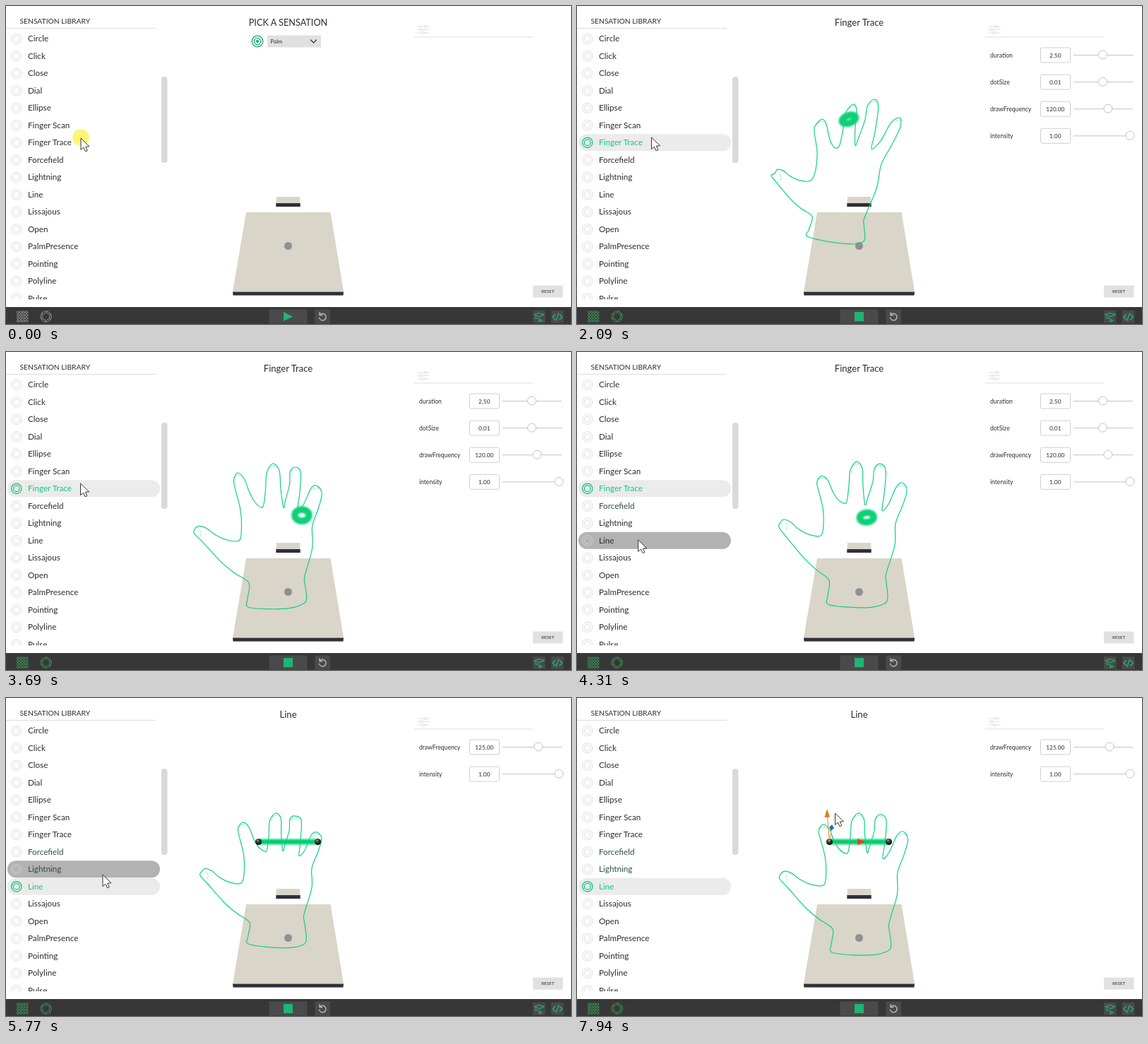
These frames come from a looping animation (800x450 px, 8 s). An HTML page:

```html
<!DOCTYPE html>
<html lang="en">
<head>
<meta charset="utf-8">
<title>Sensation library</title>
<style>
  html, body { margin: 0; width: 100%; height: 100%; overflow: hidden; background: #fff; }
  svg { display: block; width: 800px; height: 450px; font-family: Lato, "Open Sans", sans-serif; fill: #2d2d2d; }
  .line { fill: none; stroke-linecap: round; stroke-linejoin: round; }
  .green { stroke: #1fb574; }
</style>
</head>
<body>
<svg id="stage" viewBox="0 0 800 450">
  <defs>
    <clipPath id="listClip"><rect y="33" width="219" height="382"/></clipPath>
    <filter id="soft" x="-50%" y="-50%" width="200%" height="200%"><feGaussianBlur stdDeviation="1.3"/></filter>
    <filter id="softBar" filterUnits="userSpaceOnUse" x="345" y="190" width="110" height="28"><feGaussianBlur stdDeviation="1"/></filter>
    <radialGradient id="ball" cx=".4" cy=".3" r=".7">
      <stop offset="0" stop-color="#8d9690"/><stop offset=".4" stop-color="#343a36"/><stop offset="1" stop-color="#0c0f0d"/>
    </radialGradient>
  </defs>

  <g id="library">
    <text x="19.5" y="25" font-size="10.3">SENSATION LIBRARY</text>
    <path d="M0 31.5H212" stroke="#dcdcdc"/>
    <rect x="220" y="100" width="8.5" height="122" rx="4" fill="#d9d9d9"/>
    <g id="list" clip-path="url(#listClip)"></g>
  </g>

  <text id="title" x="399.5" y="27.5" font-size="13" text-anchor="middle"></text>
  <g id="picker">
    <g class="line" stroke="#12ab68" stroke-width="1.3">
      <circle cx="356" cy="50" r="7.8"/><circle cx="356" cy="50" r="4.6"/>
    </g>
    <circle cx="356" cy="50" r="2" fill="#12ab68"/>
    <rect x="370" y="41.5" width="76" height="17" fill="#dfe1e1"/>
    <text x="374.5" y="53" font-size="7.8">Palm</text>
    <path class="line" d="M431.5 48l4 4 4-4" stroke="#333" stroke-width="1.2"/>
  </g>

  <g class="line" stroke="#dedede">
    <path d="M583 29H599M583 33.5H599M583 38H599M578 44H746"/>
    <g fill="#fff"><circle cx="594" cy="29" r="1.8"/><circle cx="587" cy="33.5" r="1.8"/><circle cx="591" cy="38" r="1.8"/></g>
  </g>
  <g id="traceParams"></g>
  <g id="lineParams"></g>

  <g id="pad">
    <path d="M383 270H416L416.5 279H382.5Z" fill="#d9d5c8"/>
    <rect x="382.3" y="279" width="34.4" height="5" fill="#2e2f39"/>
    <path d="M340 292H459.5L478 404.5H321Z" fill="#d9d5c8"/>
    <path d="M321 404.5H478L477.5 409.5H321.5Z" fill="#2e2f39"/>
    <circle cx="399.5" cy="339.5" r="5.5" fill="#8e9095"/>
  </g>

  <g id="hand" class="line" stroke="#0fd084">
    <path id="outline" stroke-width="1.2"/>
    <path id="nails" stroke-width=".8" stroke-dasharray="4 2" opacity=".6"/>
  </g>
  <ellipse id="blob" rx="10" ry="8" fill="none" stroke="#08d078" stroke-width="9.5" filter="url(#soft)"/>

  <g id="segment">
    <g id="bar">
      <rect x="358" y="199.5" width="83" height="8" fill="#14d985" filter="url(#softBar)"/>
      <rect x="360" y="202" width="79" height="3" fill="#04c56c" filter="url(#softBar)"/>
    </g>
    <circle cx="357.5" cy="203.5" r="4.6" fill="url(#ball)"/>
    <circle cx="441.5" cy="203.5" r="4.6" fill="url(#ball)"/>
    <g id="gizmo">
      <path d="M357.5 203.5L354.5 168" stroke="#d98a2b"/>
      <path d="M350.5 169L354 157L358 168.5Z" fill="#d97c1e"/>
      <path d="M357.5 203.5L360 187" stroke="#c9a23c"/>
      <path d="M357 183L361 179L364 184L360 188Z" fill="#1f6fb5"/>
      <path d="M362 203.5H397" stroke="#b9742c"/>
      <path d="M397 199L408.5 203.5L397 208Z" fill="#d9481c"/>
    </g>
  </g>

  <rect x="746" y="395.5" width="42.5" height="17" fill="#e0e1e1"/>
  <text x="767.2" y="406.3" font-size="6.3" text-anchor="middle">RESET</text>

  <g id="toolbar">
    <rect y="426" width="800" height="24" fill="#373737"/>
    <g fill="#4a4a4a">
      <rect x="372.5" y="429.5" width="54" height="20"/>
      <rect x="437.5" y="429.5" width="21.5" height="20"/>
      <rect x="746" y="431" width="17.5" height="17.5"/>
      <rect x="772" y="431" width="17.5" height="17.5"/>
    </g>
    <g id="modes" class="line" stroke-width=".9">
      <g id="dots"></g>
      <circle cx="56.7" cy="439.5" r="7.6"/>
      <g id="blades"></g>
    </g>
    <path id="play" d="M393 433L406 439.5L393 446Z" fill="#1fb574"/>
    <rect id="stop" x="393" y="433" width="13" height="13" fill="#1fb574"/>
    <path class="line" d="M444.3 437.2A4.8 4.8 0 1 1 443.5 441.2M444 433.6V437.6H448" stroke="#b9b9b9" stroke-width="1.4"/>
    <path class="line green" d="M748 437L754 434.5L762 436.5L756 439.5ZM750 439.5V442L754 441.5M755 443V447L759 445Z" stroke-width="1.2"/>
    <path class="line green" d="M777.5 436.5L774 440L777.5 443.5M784 436.5L787.5 440L784 443.5M782.5 435L779 445" stroke-width="1.4"/>
  </g>

  <circle id="press" cx="106" cy="186" r="11.8" fill="#fbf45f" opacity=".85"/>
  <path id="cursor" d="M0 0V16.5L3.9 13.2L6.6 18.8L9.3 17.6L6.8 12.2L12 11.8Z" fill="#fff" stroke="#333" stroke-linejoin="round"/>
</svg>

<script>
const LOOP = 8000, ROW = 24.5, TRACE = 6, LINE = 9;
const PICK_TRACE = 310, PICK_LINE = 4540, HAND_IN = 390;
const NAMES = ['Circle', 'Click', 'Close', 'Dial', 'Ellipse', 'Finger Scan', 'Finger Trace', 'Forcefield',
  'Lightning', 'Line', 'Lissajous', 'Open', 'PalmPresence', 'Pointing', 'Polyline', 'Pulse'];

const $ = id => document.getElementById(id);
const show = (id, on) => $(id).style.display = on ? '' : 'none';

function add(parent, tag, attrs, text) {
  const el = document.createElementNS('http://www.w3.org/2000/svg', tag);
  for (const k in attrs) el.setAttribute(k, attrs[k]);
  if (text) el.textContent = text;
  parent.append(el);
  return el;
}

const rows = NAMES.map((name, i) => {
  const y = 46 + i * ROW, g = $('list');
  const pill = add(g, 'rect', { x: 2, y: y - 11.7, width: 216, height: 24, rx: 12 });
  const rings = [7.2, 4.4].map(r => add(g, 'circle', { cx: 14.8, cy: y + .3, r, fill: 'none' }));
  const label = add(g, 'text', { x: 31, y: y + 4, 'font-size': 11.7 }, name);
  return { pill, rings, label };
});

function addParams(id, params) {
  params.forEach(([name, value, knob], i) => {
    const y = 69.5 + i * 38.1, g = $(id);
    add(g, 'text', { x: 585, y: y + 3.3, 'font-size': 8.6 }, name);
    add(g, 'rect', { x: 656.5, y: y - 10.5, width: 42, height: 21, rx: 2, fill: '#fff', stroke: '#cfcfcf' });
    add(g, 'text', { x: 677.3, y: y + 3.2, 'font-size': 8.3, 'text-anchor': 'middle' }, value);
    add(g, 'path', { d: `M703 ${y}H787`, stroke: '#c4c4c4' });
    add(g, 'circle', { cx: knob, cy: y - .5, r: 6, fill: '#fff', stroke: '#c2c2c2' });
  });
}
addParams('traceParams', [['duration', '2.50', 744.5], ['dotSize', '0.01', 744.5],
  ['drawFrequency', '120.00', 752], ['intensity', '1.00', 783]]);
addParams('lineParams', [['drawFrequency', '125.00', 754], ['intensity', '1.00', 783]]);

for (let i = 0; i < 16; i++)
  add($('dots'), 'circle', { cx: 17 + i % 4 * 4.1, cy: 433.4 + (i >> 2) * 4.1, r: 1.6 });
for (let i = 0; i < 6; i++)
  add($('blades'), 'path', { d: 'M53 436.2L58.7 432.2', transform: `rotate(${i * 60} 56.7 439.5)` });

// Hand outline: each group starts at a landmark, followed by the points up to the next one.
const CONTOUR = [
  [366,328, 348,313, 330,296, 305,266, 295,253],
  [297,246, 302,242, 312,246, 322,255, 337,263],
  [354,265, 358,250, 357,225, 350,197, 349,188],
  [355,180, 364,186, 371,202, 378,213],
  [387,219, 391,216, 394,195, 396,172],
  [405,160, 413,170, 414,195],
  [417,221, 421,210, 428,188, 430,170],
  [438,163, 446,172, 444,205],
  [441,229, 450,220, 461,196],
  [470,190, 476,201, 470,222, 460,248, 459,278],
  [447,318, 447,330, 449,352],
  [444,361, 425,366, 395,366],
  [365,362, 364,350]
];
const V0 = 2, INDEX = 3, V1 = 4, MIDDLE = 5, V2 = 6, RING = 7, V3 = 8, PINKY = 9, THUMB = 1;
const BASE = CONTOUR.flatMap(c => c.slice(0, 2));
const HIGH = [370,308, 308,218, 367,245, 384,162, 408,208, 433,153, 436,213, 461,160, 457,225, 492,189, 450,312, 445,347, 364,341];
const TILT = [333,298, 280,237, 331,247, 347,160, 366,201, 391,139, 394,197, 421,132, 417,202, 457,158, 407,300, 402,335, 326,326];
const LEFT = [344,327, 267,251, 330,267, 328,171, 361,220, 378,158, 393,220, 409,163, 413,223, 440,189, 423,317, 421,356, 343,361];
const FLAT = [345,318, 277,246, 333,262, 335,176, 366,217, 382,163, 392,216, 409,167, 415,223, 440,190, 422,306, 421,349, 343,348];
const REST = [362,327, 288,250, 349,265, 348,179, 380,220, 398,163, 411,219, 430,165, 433,227, 462,189, 442,318, 440,358, 361,360];

const shift = (pose, dx, dy) => pose.map((v, i) => v + (i % 2 ? dy : dx));
const POSES = [
  [HAND_IN, shift(HIGH, -6, 8)], [1100, shift(HIGH, -1, 1)], [1400, HIGH], [1900, shift(TILT, 6, -4)], [2090, TILT],
  [2550, shift(LEFT, -20, 26)], [2950, shift(LEFT, -9, 6)], [3690, LEFT], [4250, shift(BASE, -10, -5)],
  [4850, BASE], [5770, FLAT], [6250, shift(REST, -5, -1)], [7000, shift(REST, -4, 0)],
  [7500, shift(REST, 0, -1)], [7940, REST], [8020, REST]
];
const CURSOR = [
  [0, [106, 187]], [80, [105.5, 186]], [3850, [105.5, 186]], [4440, [84, 277]], [5400, [84, 277]],
  [5720, [137, 250]], [7100, [137, 250]], [7500, [357, 203]], [7560, [357, 203]], [7860, [365.5, 163]], [8020, [365.5, 163]]
];

// Blob route over the hand: phase, landmark pair to average, offset.
const ROUTE = [
  [0, PINKY, PINKY, -4, 18], [.08, V3, V3, 6, 8], [.164, V2, V3, -10, 15], [.25, RING, RING, -5, 18],
  [.33, V2, V3, -10, 15], [.36, V1, V2, -3, 12], [.44, MIDDLE, MIDDLE, -6, 21], [.53, V1, V2, -3, 12],
  [.56, V1, V1, -16, 10], [.65, INDEX, INDEX, 0, 18], [.73, V1, V1, -16, 10], [.81, V0, V0, -8, 14],
  [.92, THUMB, THUMB, 12, 12], [1, PINKY, PINKY, -4, 18]
];

function span(keys, t) {
  let i = 0;
  while (i < keys.length - 2 && t >= keys[i + 1][0]) i++;
  const u = (t - keys[i][0]) / (keys[i + 1][0] - keys[i][0]);
  return [i, Math.min(1, Math.max(0, u))];
}

const mix = (a, b, u) => a.map((v, i) => v + (b[i] - v) * u);

function lerpAt(keys, t, ease = u => u) {
  const [i, u] = span(keys, t);
  return mix(keys[i][1], keys[i + 1][1], ease(u));
}

const smooth = u => u * u * (3 - 2 * u);

// Hermite curve through the keys, with reduced tangents to keep overshoot low.
function curveAt(keys, t) {
  const [i, u] = span(keys, t), dt = keys[i + 1][0] - keys[i][0];
  const slope = (k, n) => {
    const a = keys[Math.max(0, k - 1)], b = keys[Math.min(keys.length - 1, k + 1)];
    return .6 * (b[1][n] - a[1][n]) / (b[0] - a[0]);
  };
  return keys[i][1].map((a, n) => {
    const b = keys[i + 1][1][n], e = smooth(u);
    return a + (b - a) * e + dt * u * (1 - u) * ((1 - u) * slope(i, n) - u * slope(i + 1, n));
  });
}

function outlineOf(pose) {
  const pts = [], count = CONTOUR.length;
  CONTOUR.forEach((part, k) => {
    const next = (k + 1) % count, size = part.length / 2;
    for (let j = 0; j < size; j++) {
      const move = n => {
        const from = pose[2 * k + n] - BASE[2 * k + n], to = pose[2 * next + n] - BASE[2 * next + n];
        return from + (to - from) * j / size;
      };
      pts.push([part[2 * j] + move(0), part[2 * j + 1] + move(1)]);
    }
  });
  return pts;
}

function closedPath(pts) {
  const at = i => pts[(i + pts.length) % pts.length], f = v => v.toFixed(1);
  let d = 'M' + pts[0].map(f);
  pts.forEach((p, i) => {
    const a = at(i - 1), q = at(i + 1), b = at(i + 2);
    const c1 = [0, 1].map(n => f(p[n] + (q[n] - a[n]) / 6));
    const c2 = [0, 1].map(n => f(q[n] - (b[n] - p[n]) / 6));
    d += `C${c1} ${c2} ${q.map(f)}`;
  });
  return d + 'Z';
}

function drawHand(pose) {
  $('outline').setAttribute('d', closedPath(outlineOf(pose)));
  const nail = k => `M${pose[2 * k] - 6} ${pose[2 * k + 1] + 6}q6 -5 12 -1`;
  const [x, y] = pose.slice(2 * THUMB);
  $('nails').setAttribute('d', [INDEX, MIDDLE, RING, PINKY].map(nail).join('') + `M${x + 7} ${y + 1}q4 4 1 9`);
}

function drawBlob(pose, t) {
  const phase = ((t - 1400) / 2500 + .164 + 1) % 1;
  const spots = ROUTE.map(([p, a, b, dx, dy]) =>
    [p, [(pose[2 * a] + pose[2 * b]) / 2 + dx, (pose[2 * a + 1] + pose[2 * b + 1]) / 2 + dy]]);
  const [x, y] = lerpAt(spots, phase);
  const lean = lerpAt([[0, [0]], [.08, [0]], [.164, [15]], [.44, [-20]], [.73, [10]], [1, [0]]], phase)[0];
  const ry = lerpAt([[0, [7.5]], [.164, [8.6]], [.44, [5.6]], [.73, [8]], [1, [7.5]]], phase)[0];
  $('blob').setAttribute('ry', ry);
  $('blob').setAttribute('transform', `translate(${x} ${y}) rotate(${lean})`);
}

function drawList(t, picked, hover) {
  rows.forEach(({ pill, rings, label }, i) => {
    const on = i === picked, over = i === hover;
    const tinted = i === 7 && t > 4000 || i === 8 && t > 5450;
    pill.setAttribute('fill', on ? '#ebebeb' : over ? '#b2b2b2' : 'none');
    rings.forEach(r => {
      r.setAttribute('stroke', on ? '#12c77b' : over ? '#d0d0d0' : '#dddddd');
      r.setAttribute('stroke-width', on ? 1.3 : 1);
    });
    label.setAttribute('fill', on ? '#12c77b' : tinted ? '#2f5139' : '#2d2d2d');
  });
}

function draw(t) {
  const picked = t < PICK_TRACE ? -1 : t < PICK_LINE ? TRACE : LINE;
  const [cx, cy] = lerpAt(CURSOR, t, smooth);
  const hover = t < 80 || cx > 218 ? -1 : Math.floor((cy - 34) / ROW);

  drawList(t, picked, hover);
  $('cursor').setAttribute('transform', `translate(${cx} ${cy})`);
  $('press').style.opacity = t < 80 ? .85 : t < 160 ? .4 : 0;
  $('title').textContent = picked < 0 ? 'PICK A SENSATION' : NAMES[picked];
  $('title').setAttribute('font-size', picked < 0 ? 12.7 : 13.1);
  $('modes').setAttribute('stroke', t < 1900 ? '#9a9a9a' : '#3f9d5c');

  show('picker', picked < 0);
  show('play', picked < 0);
  show('stop', picked >= 0);
  show('traceParams', picked === TRACE);
  show('lineParams', picked === LINE);
  show('segment', picked === LINE);
  show('bar', t >= 5000);
  show('gizmo', t >= 7530);

  const handIn = t >= HAND_IN;
  show('hand', handIn);
  show('blob', handIn && picked === TRACE);
  if (handIn) {
    const pose = curveAt(POSES, t);
    drawHand(pose);
    drawBlob(pose, t);
  }
}

const start = performance.now();
function tick() {
  draw((performance.now() - start) % LOOP);
  requestAnimationFrame(tick);
}
tick();
</script>
</body>
</html>
```
